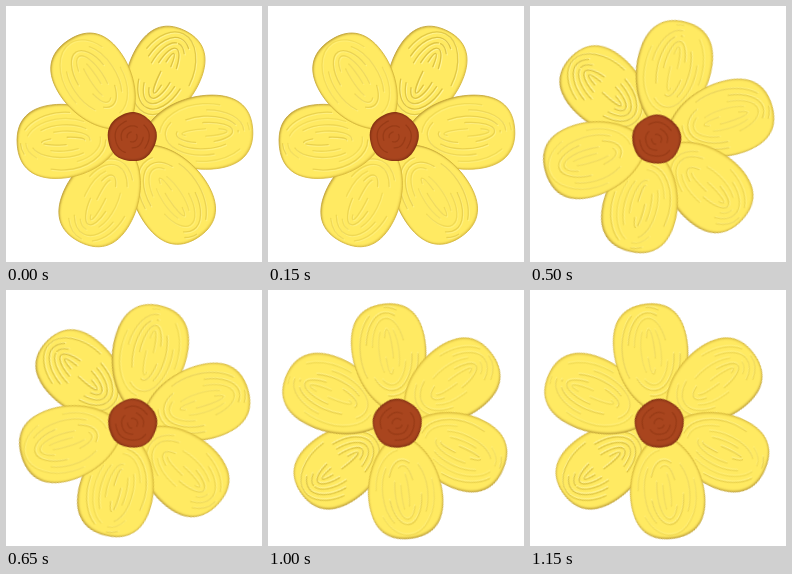
Write an HTML page that moves like this. It is 256 px wide and 256 px high and loops after 1.25 s.

```html
<!DOCTYPE html>
<html lang="en">
<head>
<meta charset="utf-8">
<title>Yellow flower</title>
<style>
  html, body { margin: 0; width: 100%; height: 100%; overflow: hidden; background: #fff; }
  svg { display: block; width: 100vw; height: 100vh; }
  .petal { fill: #ffea62; stroke: #e6cb48; stroke-width: .8; }
  .heart { fill: #a9451e; }
  .groove, .ridge, .dent { fill: none; stroke-linecap: round; stroke-width: 1.3; }
  .groove { stroke: #d8bd3c; }
  .ridge { stroke: #fff59c; }
  .dent { stroke: #8d3512; }
</style>
</head>
<body>
<svg id="stage" viewBox="0 0 256 256">
  <defs>
    <filter id="bevel" x="-10%" y="-10%" width="120%" height="120%" color-interpolation-filters="sRGB">
      <feGaussianBlur in="SourceAlpha" stdDeviation="1" result="soft"/>
      <feOffset in="soft" dx="1" dy="1.2" result="down"/>
      <feFlood flood-color="#b0902c" flood-opacity=".85"/>
      <feComposite in2="down" operator="out"/>
      <feComposite in2="SourceGraphic" operator="atop" result="shaded"/>
      <feOffset in="soft" dx="-1" dy="-1.2" result="up"/>
      <feFlood flood-color="#d2b233" flood-opacity=".8"/>
      <feComposite in2="up" operator="out"/>
      <feComposite in2="shaded" operator="atop"/>
    </filter>
  </defs>
</svg>
<script>
const HOLD = 250;
const TURNS = [0, -24, -73, -104, -153];
const PIVOT = '128 131.8';
const HEART = '-1.9 -0.9';
const PETALS = 6;

function add(parent, tag, attrs) {
  const node = document.createElementNS('http://www.w3.org/2000/svg', tag);
  for (const key in attrs) node.setAttribute(key, attrs[key]);
  return parent.appendChild(node);
}

function random(seed) {
  const n = Math.sin(seed * 127.1 + 11.7) * 43758.5453;
  return n - Math.floor(n);
}

// Egg shape along +x, narrow at the start.
function egg(start, end, w) {
  const at = k => start + (end - start) * k;
  return `M${start} 0C${at(.07)} ${-w * .6} ${at(.34)} ${-w} ${at(.6)} ${-w}` +
    `C${at(.86)} ${-w} ${end} ${-w * .66} ${end} 0` +
    `C${end} ${w * .66} ${at(.86)} ${w} ${at(.6)} ${w}` +
    `C${at(.34)} ${w} ${at(.07)} ${w * .6} ${start} 0Z`;
}

function addPetal(parent, i) {
  const angle = i * 60 - 63.5;
  const reach = 118 + 3 * Math.cos((i - 1.3) * Math.PI / 3);
  const width = i ? 37 : 36;
  const turn = `rotate(${angle})`;
  const petal = add(parent, 'g', { filter: 'url(#bevel)' });
  add(petal, 'path', { class: 'petal', d: egg(11, reach, width), transform: turn });

  // Long finger strokes around the petal's axis; the rear petal is scored deeper.
  for (let level = 0; level < 5; level++) {
    const r = k => random(i * 40 + level * 7 + k);
    const size = .78 - level * .17;
    const stroke = {
      cx: reach * .6, cy: 0, rx: reach * (.16 + size * .27), ry: width * size,
      pathLength: 100,
      'stroke-dasharray': `${24 + r(1) * 14} ${10 + r(2) * 10} ${18 + r(3) * 12} 22`,
      'stroke-dashoffset': r(4) * 100,
      opacity: (i ? .3 : .65) + r(5) * .3
    };
    add(petal, 'ellipse', { ...stroke, class: 'ridge', transform: `translate(1 1.1) ${turn}` });
    add(petal, 'ellipse', { ...stroke, class: 'groove', transform: turn });
  }
}

function addHeart(parent) {
  const heart = add(parent, 'g', { filter: 'url(#heartBevel)' });
  const ring = radius => {
    const points = Array.from({ length: 72 }, (_, i) => {
      const t = i * Math.PI / 36;
      const r = radius * (1 + .015 * Math.cos(5 * t + 1));
      return `${(r * Math.cos(t)).toFixed(1)} ${(r * Math.sin(t)).toFixed(1)}`;
    });
    return `M${points.join('L')}Z`;
  };
  add(heart, 'path', { class: 'heart', d: ring(24.5) });
  [17, 11, 5].forEach((radius, i) => add(heart, 'path', {
    class: 'dent', d: ring(radius), pathLength: 100, opacity: .6,
    'stroke-dasharray': '38 18 24 20', 'stroke-dashoffset': random(i + 1) * 100
  }));
}

// The heart shares the petals' bevel in brown.
const bevel = document.getElementById('bevel');
const heartBevel = bevel.cloneNode(true);
heartBevel.id = 'heartBevel';
heartBevel.querySelectorAll('feFlood').forEach(flood => flood.setAttribute('flood-color', '#74290c'));
bevel.after(heartBevel);

const flower = add(document.getElementById('stage'), 'g', {});
for (let i = 0; i < PETALS; i++) addPetal(flower, i);
addHeart(flower);

function draw(time) {
  const turn = TURNS[Math.floor(time / HOLD) % TURNS.length];
  flower.setAttribute('transform', `translate(${PIVOT}) rotate(${turn}) translate(${HEART})`);
}

const begin = performance.now();
function tick() {
  draw(performance.now() - begin);
  requestAnimationFrame(tick);
}
tick();
</script>
</body>
</html>
```
